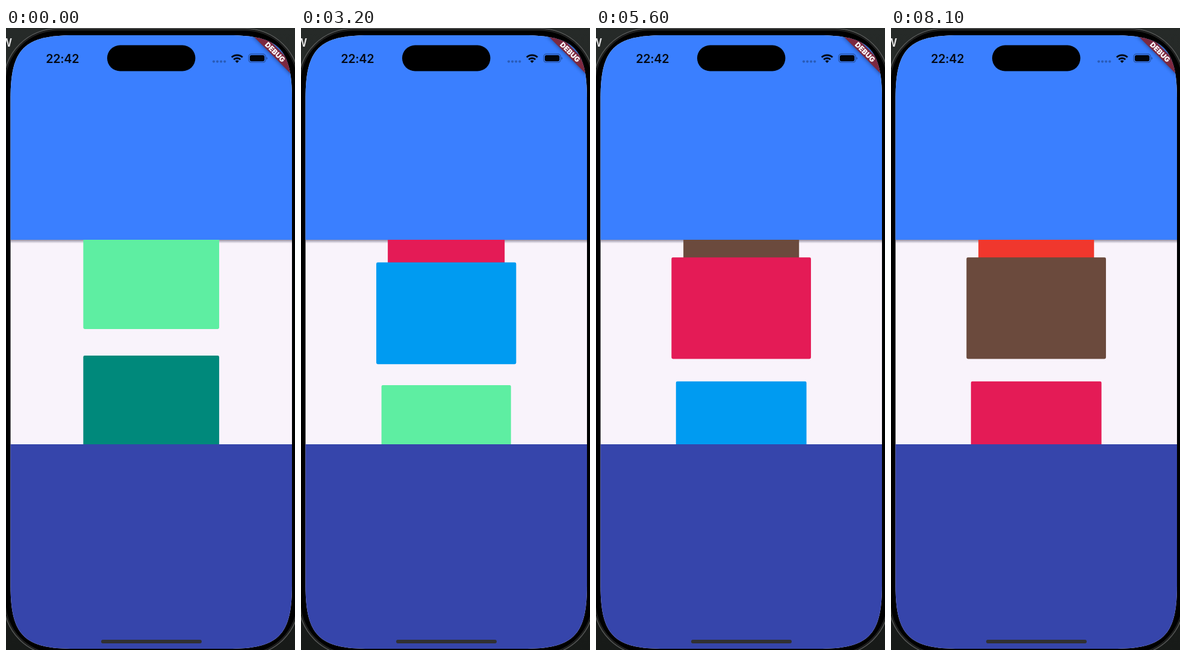
An HTML page for the animation above (8.2 s loop, 480 by 1031 pixels).

```html
<!DOCTYPE html>
<html lang="en">
<head>
<meta charset="utf-8">
<title>Card wheel</title>
<style>
  html, body { margin: 0; width: 100%; height: 100%; overflow: hidden; background: #1b1d1b; }
  svg { display: block; width: 480px; height: 1031px; font-family: Inter, Roboto, sans-serif; }
</style>
</head>
<body>
<svg viewBox="0 0 480 1031">
  <defs>
    <clipPath id="screen"><path id="screenShape"/></clipPath>
    <clipPath id="window"><rect x="7" y="351" width="469" height="339.5"/></clipPath>
    <linearGradient id="dusk" x2="0" y2="1">
      <stop offset="0" stop-color="#262a28"/>
      <stop offset="1" stop-color="#171a18"/>
    </linearGradient>
    <linearGradient id="drop" x2="0" y2="1">
      <stop offset="0" stop-color="#55506a" stop-opacity=".6"/>
      <stop offset="1" stop-color="#55506a" stop-opacity="0"/>
    </linearGradient>
    <filter id="soft" x="-20%" y="-80%" width="140%" height="260%"><feGaussianBlur stdDeviation="3"/></filter>
  </defs>

  <!-- backdrop and phone body -->
  <rect width="480" height="1031" fill="url(#dusk)"/>
  <text x="10" y="31" text-anchor="end" font-size="18" font-weight="600" fill="#e4e4e4">W</text>
  <rect x="-4" y="1" width="491" height="1039" rx="90" fill="#000" stroke="#555756" stroke-width="1.6"/>
  <rect x="-1.5" y="3.5" width="486" height="1034" rx="87" fill="none" stroke="#202120" stroke-width="2"/>

  <g clip-path="url(#screen)">
    <rect width="480" height="1031" fill="#f9f3fb"/>
    <rect y="351" width="480" height="6" fill="url(#drop)"/>
    <g id="wheel" clip-path="url(#window)"></g>
    <rect width="480" height="351" fill="#3a7fff"/>
    <rect y="690" width="480" height="341" fill="#3645ab"/>

    <!-- corner banner -->
    <g transform="translate(475 12) rotate(45) scale(1.163)">
      <rect x="-40" y="28" width="80" height="12" fill="#000" opacity=".5" filter="url(#soft)"/>
      <rect x="-40" y="28" width="80" height="12" fill="#7c2940"/>
      <text y="37.8" text-anchor="middle" font-size="10.2" font-weight="900" fill="#fff">DEBUG</text>
    </g>

    <!-- status bar -->
    <text x="93.8" y="57.5" text-anchor="middle" font-size="19.8" font-weight="600" letter-spacing="-.3" fill="#040914">22:42</text>
    <rect x="168" y="28.5" width="146.5" height="43" rx="21.5"/>
    <g fill="#2a5cb8">
      <circle cx="345" cy="55.6" r="2.1"/><circle cx="351.1" cy="55.6" r="2.1"/>
      <circle cx="357.2" cy="55.6" r="2.1"/><circle cx="363.3" cy="55.6" r="2.1"/>
    </g>
    <g fill="none" stroke="#040914" stroke-width="2.8">
      <path d="M374.8 48.6A13 13 0 0 1 392.8 48.6"/>
      <path d="M378.2 52.3A8 8 0 0 1 389.4 52.3"/>
      <path d="M383.8 58L380.7 54.8A4.4 4.4 0 0 1 386.9 54.8Z" fill="#040914" stroke="none"/>
    </g>
    <rect x="403" y="43.2" width="28.2" height="13.8" rx="4.4" fill="none" stroke="#254f9e" stroke-width="1.2"/>
    <rect x="404.9" y="45" width="24.4" height="10.2" rx="2.9" fill="#02050c"/>
    <path d="M432.6 47.8a2.6 2.6 0 0 1 0 4.8z" fill="#254f9e"/>

    <rect x="158" y="1014" width="167" height="6" rx="3" fill="#303033"/>
  </g>
</svg>
<script>
const LOOP = 8200, TICK = 100, SPEED = 0.4, START = -0.5;
const STEP = Math.PI / 4, RADIUS = 282, DEPTH = 0.484;
const CENTER = { x: 241.2, y: 521 }, CARD = { w: 234, h: 170 };
// top to bottom on the wheel, from slot -4 to slot 1
const COLORS = ['#f0372d', '#6b4a3d', '#e41b56', '#009bf1', '#5eeea2', '#00897b'];

// continuous screen corners: each one spans `reach`, with its handles at `pull`
function screenPath(l, t, r, b, reach, pull) {
  return `M${l} ${t + reach}C${l} ${t + pull} ${l + pull} ${t} ${l + reach} ${t}` +
    `H${r - reach}C${r - pull} ${t} ${r} ${t + pull} ${r} ${t + reach}` +
    `V${b - reach}C${r} ${b - pull} ${r - pull} ${b} ${r - reach} ${b}` +
    `H${l + reach}C${l + pull} ${b} ${l} ${b - pull} ${l} ${b - reach}Z`;
}
document.getElementById('screenShape')
  .setAttribute('d', screenPath(7.5, 12, 475, 1029, 105, 22.6));

const wheel = document.getElementById('wheel');
const cards = COLORS.map((color, i) => {
  const node = document.createElementNS('http://www.w3.org/2000/svg', 'rect');
  node.setAttribute('fill', color);
  return { node, slot: i - 4, offset: 0 };
});

function place({ node, offset }) {
  const angle = offset * STEP;
  const scale = 1 / (1 + DEPTH * (1 - Math.cos(angle)));
  const w = CARD.w * scale, h = CARD.h * scale;
  const box = {
    x: CENTER.x - w / 2,
    y: CENTER.y + RADIUS * Math.sin(angle) * scale - h / 2,
    width: w, height: h, rx: 2.5 * scale
  };
  for (const key in box) node.setAttribute(key, box[key].toFixed(2));
  node.style.display = Math.abs(offset) < 1.8 ? '' : 'none';
}

let shown = -1;
function draw(now) {
  const time = Math.floor((now % LOOP) / TICK) * TICK;
  if (time !== shown) {
    shown = time;
    const turn = START + SPEED * time / 1000;
    for (const card of cards) {
      card.offset = card.slot + turn;
      place(card);
    }
    // nearest card goes on top
    const ordered = [...cards].sort((a, b) => Math.abs(b.offset) - Math.abs(a.offset));
    wheel.append(...ordered.map(card => card.node));
  }
}

const begin = performance.now();
function loop() {
  draw(performance.now() - begin);
  requestAnimationFrame(loop);
}
loop();
</script>
</body>
</html>
```
